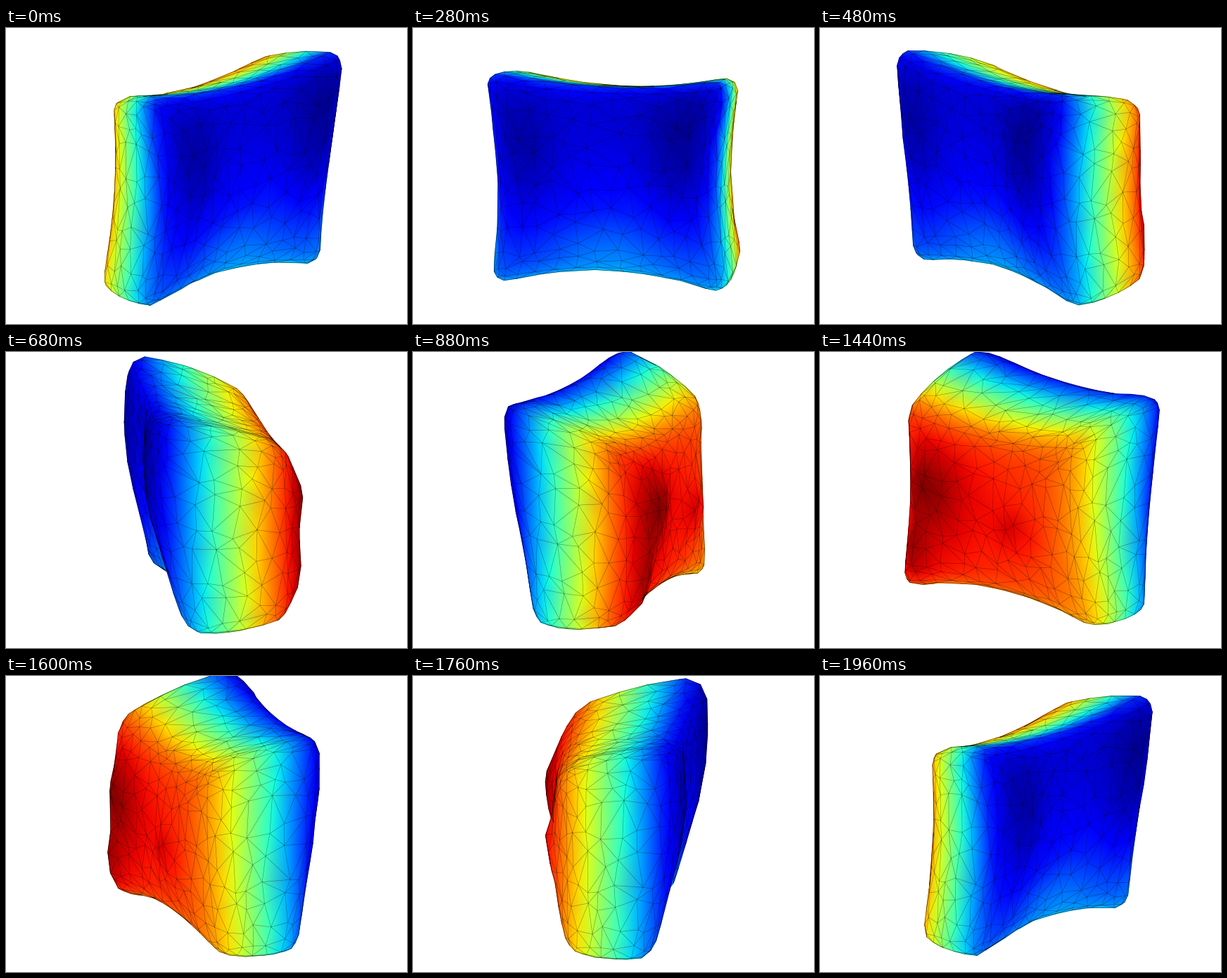
Animation of 570 by 422 pixels, one loop 2 s. Source, as a matplotlib script:

```python
import numpy as np
import matplotlib.pyplot as plt
from matplotlib.animation import ArtistAnimation
from matplotlib.collections import LineCollection
from matplotlib.tri import Triangulation

W, H = 570, 422
FRAMES, STEP = 50, 40
CENTER_X, START = 293, 40        # axis of rotation (px), first angle (deg)
SIN_EL = 0.30                    # camera elevation
COS_EL = np.sqrt(1 - SIN_EL ** 2)
COUNTS = (14, 8, 11)             # mesh nodes along width, depth, height
HALF, ROUND = np.array([155, 88, 125]), 26
SWELL = np.array([1.08, 1.05, 1.11])

# Corners as (x, depth, height on screen), indexed [right][blue side][bottom].
CORNERS = np.array([
    [[(-130, -62, 103), (-154, -56, 340)], [(-171, 90, 61), (-162, 66, 342)]],
    [[(150, -82, 101), (152, -83, 332)], [(158, 98, 55), (151, 56, 345)]],
], float)

rng = np.random.default_rng(7)


def warp(t):
    """Pull nodes towards the rims."""
    return 0.6 * t + 0.4 * np.sin(np.pi / 2 * t)


def face(axis, side):
    a, b = [k for k in range(3) if k != axis]
    na, nb = COUNTS[a], COUNTS[b]
    i, j = [g.ravel().astype(float) for g in np.mgrid[:na, :nb]]
    inner = (i > 0) & (i < na - 1) & (j > 0) & (j < nb - 1)
    i[inner] += rng.uniform(-0.38, 0.38, inner.sum())
    j[inner] += rng.uniform(-0.38, 0.38, inner.sum())
    tris = Triangulation(i, j).triangles
    p = np.full((len(i), 3), float(side))
    p[:, a] = warp(2 * i / (na - 1) - 1)
    p[:, b] = warp(2 * j / (nb - 1) - 1)
    v = p[tris]
    normal = np.cross(v[:, 1] - v[:, 0], v[:, 2] - v[:, 0])[:, axis]
    flip = normal * side < 0
    tris[flip] = tris[flip][:, ::-1]
    return p, tris


def cube_mesh():
    points, tris, base = [], [], 0
    for axis in range(3):
        for side in (-1, 1):
            p, t = face(axis, side)
            points.append(p)
            tris.append(t + base)
            base += len(p)
    points, index = np.unique(np.round(np.vstack(points), 6), axis=0,
                              return_inverse=True)
    return points, index.ravel()[np.vstack(tris)]


def round_edges(p):
    q = p * HALF
    core = np.clip(q, ROUND - HALF, HALF - ROUND)
    d = q - core
    return (core + ROUND * d / np.linalg.norm(d, axis=1, keepdims=True)) / HALF


def bump(u, w, u0, w0, su, sw):
    return np.exp(-((u - u0) / su) ** 2 - ((w - w0) / sw) ** 2)


def shape(p):
    """Bend the rounded cube into the cushion."""
    u, v, w = p.T
    blend = [np.stack([(1 - t) / 2, (1 + t) / 2], 1) for t in (SWELL * p).T]
    out = np.einsum('ni,nj,nk,ijkd->nd', *blend, CORNERS)
    mu, mv, mw = 1 - u ** 2, 1 - v ** 2, 1 - w ** 2
    # pinched along the rims, swollen halfway through the depth
    out[:, 0] += u * (8 * mv - 17 * mw)
    out[:, 2] += 9 * w * u ** 2 * mv - mu * np.where(w > 0, 24 * w, 14 * w)
    red, blue = np.clip(-v, 0, 1) ** 2, np.clip(v, 0, 1) ** 2
    out[:, 1] -= red * (17 * (1 - u ** 4) * (1 - w ** 4)
                        + 20 * bump(u, w, 0.58, -0.28, 0.32, 0.4)
                        + 15 * bump(u, w, -0.45, 0.05, 0.28, 0.3)
                        + 17 * bump(u, w, 0.8, 0.5, 0.18, 0.5))
    out[:, 1] += blue * (10 * mw
                         + 14 * bump(np.abs(u), w, 0.7, -0.3, 0.28, 0.7)
                         - 12 * bump(u, w, 0, 0.75, 0.45, 0.4))
    return out


def cross(a, b):
    return a[..., 0] * b[..., 1] - a[..., 1] * b[..., 0]


def covered(tri_xy, depth):
    """True where a triangle's middle lies behind another triangle."""
    mid = tri_xy.mean(axis=1)
    inside = depth[None, :] > depth[:, None] + 6
    for k in range(3):
        a, b = tri_xy[:, k], tri_xy[:, (k + 1) % 3]
        inside &= cross((b - a)[None], mid[:, None] - a[None]) < 0
    return inside.any(axis=1)


def draw(n):
    th = np.radians(START - 360 * n / FRAMES)
    x, y, z = body.T
    near = y * np.cos(th) - x * np.sin(th)
    xy = np.stack([CENTER_X + x * np.cos(th) + y * np.sin(th),
                   z + SIN_EL * near], 1)
    depth = (COS_EL * near - SIN_EL / COS_EL * z)[tris].mean(axis=1)
    v = xy[tris]
    front = cross(v[:, 1] - v[:, 0], v[:, 2] - v[:, 0]) < 0
    order = np.argsort(depth)
    order = order[front[order]]
    shown = tris[order]
    skin = ax.tripcolor(Triangulation(*xy.T, shown), value, shading='gouraud',
                        cmap='jet', vmin=0, vmax=1)
    seen = shown[~covered(xy[shown], depth[order])]
    pairs = np.sort(np.vstack([seen[:, [0, 1]], seen[:, [1, 2]],
                               seen[:, [2, 0]]]), axis=1)
    edges, uses = np.unique(pairs, axis=0, return_counts=True)
    ink = np.zeros((len(edges), 4))
    ink[:, 3] = np.where(uses == 1, 0.7, 0.42)
    wires = LineCollection(xy[edges], colors=ink, linewidths=0.4)
    ax.add_collection(wires, autolim=False)
    return [skin, wires]


nodes, tris = cube_mesh()
body = shape(round_edges(nodes))
value = np.clip(0.5 - body[:, 1] / 235, 0, 1)

fig = plt.figure(figsize=(W / 100, H / 100), dpi=100, facecolor='white')
ax = fig.add_axes([0, 0, 1, 1])
ax.axis('off')
ax.set_xlim(0, W)
ax.set_ylim(H, 0)

anim = ArtistAnimation(fig, [draw(n) for n in range(FRAMES)], interval=STEP,
                       repeat=True, repeat_delay=0)
plt.show()
```
